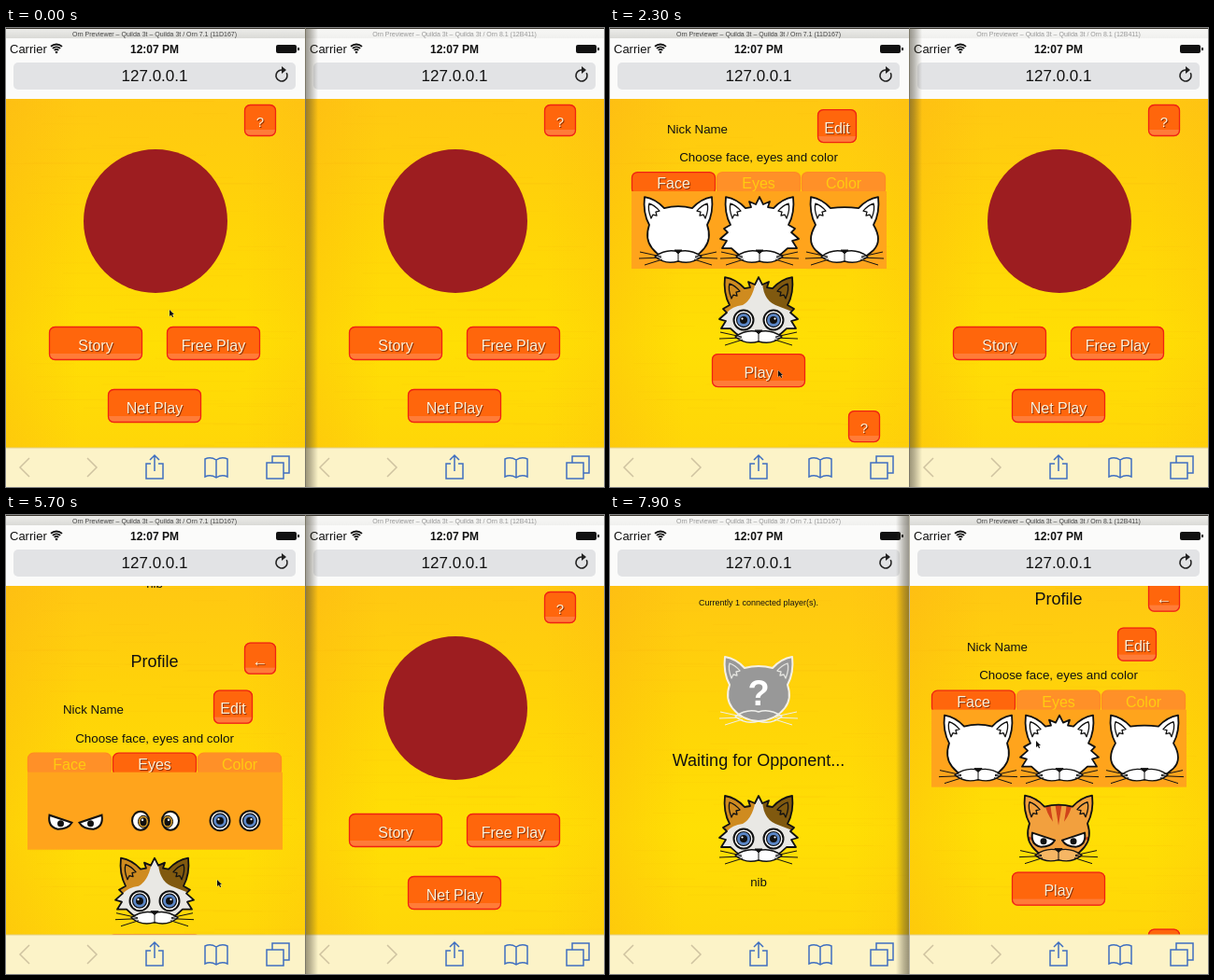
Write an HTML page with a canvas that moves like this. It is 640 px wide and 492 px high and loops after 8 s.

```html
<!DOCTYPE html>
<html lang="en">
<head>
<meta charset="utf-8">
<title>Two phones</title>
<style>
html, body { margin: 0; width: 100%; height: 100%; overflow: hidden; background: #fff; }
canvas { display: block; }
</style>
</head>
<body>
<canvas id="stage" width="640" height="492"></canvas>
<script>
const ctx = document.getElementById('stage').getContext('2d');
const LOOP = 8000, PAGE = 374, TOP = 76, BOTTOM = 450, SHIFT = 321, MID = 159;
const SANS = '"Liberation Sans", Arial, sans-serif';
const NICK = 'nib';

// Timed cursor stops: time, x, y
const stops = [
  [0, 175, 302], [350, 175, 302], [1100, 167, 415], [1750, 167, 415], [2300, 180, 367],
  [2650, 243, 150], [3600, 243, 152], [4050, 158, 210], [4250, 158, 210],
  [4550, 157, 269], [4700, 157, 269], [4950, 245, 270], [5100, 245, 270],
  [5350, 168, 412], [5480, 168, 412], [5700, 226, 391], [5900, 232, 388],
  [6600, 371, 413], [6850, 440, 405], [7200, 444, 405], [7900, 456, 242]
];
const clicks = [[1150, 1500], [2680, 2800], [4120, 4240], [4560, 4590], [4970, 5090], [5370, 5460]];

const HALF_TOP = 'M-15-25';
const RIGHT_EAR = '15-25Q24-35 36-37Q38-20 31-7';
const LEFT_EAR = 'Q-38-20-36-37Q-24-35-15-25Z';
const heads = [
  HALF_TOP + 'Q0-29 ' + RIGHT_EAR + 'Q36 8 28 18Q18 31 0 32Q-18 31-28 18Q-36 8-31-7' + LEFT_EAR,
  HALF_TOP + 'L-9-26L-11-32L-4-29L0-37L4-29L11-32L9-26L' + RIGHT_EAR +
    'L38-3L34 1L42 8L35 10L40 18L30 18Q18 31 0 32Q-18 31-30 18L-40 18L-35 10L-42 8L-34 1L-38-3L-31-7' + LEFT_EAR,
  HALF_TOP + 'Q0-27 ' + RIGHT_EAR + 'Q41 10 31 20Q19 32 0 32Q-19 32-31 20Q-41 10-31-7' + LEFT_EAR
].map(d => new Path2D(d));
const ears = new Path2D('M-29-14Q-33-24-31-30Q-25-28-20-22L-24-21L-23-17L-27-18ZM29-14Q33-24 31-30Q25-28 20-22L24-21L23-17L27-18Z');
const muzzle = new Path2D('M-25 27Q-12 18 0 22Q12 18 25 27Q14 36 0 32Q-14 36-25 27Z');
const whiskers = new Path2D('M-18 27L-41 22M-18 28L-42 29M-17 30L-36 36M18 27L41 22M18 28L42 29M17 30L36 36');
const nose = new Path2D('M-4 20H4L0 24ZM0 24V32');
const angryEye = new Path2D('M-12 2L12-6Q14 7 3 9Q-8 9-12 2Z');

const coats = {
  white: { base: '#fff', patches: [] },
  calico: {
    base: '#e9e8e4',
    patches: [['#cf8b1f', 'M-42-42H-2Q-4-14-17-7Q-28-6-35 2L-42-4Z'], ['#80590f', 'M42-42H4Q2-14 18-7L36 0L42-4Z']]
  },
  tabby: {
    base: '#f2a03e',
    patches: [['#d0441a', 'M-4-30L0-5L4-30ZM-15-30Q-13-18-6-9Q-8-20-9-30ZM15-30Q13-18 6-9Q8-20 9-30ZM-36 6L-24 9L-36 12ZM36 6L24 9L36 12Z']]
  }
};
for (const c of Object.values(coats)) c.patches.forEach(p => { p[1] = new Path2D(p[1]); });

function text(s, x, y, size, color = '#111', align = 'center', weight = '') {
  ctx.font = `${weight} ${size}px ${SANS}`;
  ctx.textAlign = align;
  ctx.textBaseline = 'alphabetic';
  ctx.fillStyle = color;
  ctx.fillText(s, x, y + size * 0.36);
}

function box(x, y, w, h, r, fill, line, width = 1.5) {
  ctx.beginPath();
  ctx.roundRect(x, y, w, h, r);
  if (fill) { ctx.fillStyle = fill; ctx.fill(); }
  if (line) { ctx.strokeStyle = line; ctx.lineWidth = width; ctx.stroke(); }
}

function at(x, y, draw) {
  ctx.save();
  ctx.translate(x, y);
  draw();
  ctx.restore();
}

function ink(path, color, width) {
  ctx.strokeStyle = color;
  ctx.lineWidth = width;
  ctx.stroke(path);
}

function disc(x, y, rx, ry, fill, line) {
  ctx.beginPath();
  ctx.ellipse(x, y, rx, ry, 0, 0, 7);
  ctx.fillStyle = fill;
  ctx.fill();
  if (line) { ctx.strokeStyle = '#111'; ctx.lineWidth = line; ctx.stroke(); }
}

function gradient(x0, y0, x1, y1, ...list) {
  const g = ctx.createLinearGradient(x0, y0, x1, y1);
  for (const [stop, color] of list) g.addColorStop(stop, color);
  return g;
}

function button(label, x, y, w, h, pressed, size = 16) {
  box(x, y, w, h, 6, pressed ? '#ff9f3a' : '#ff660c');
  ctx.save();
  ctx.clip();
  ctx.fillStyle = pressed ? '#ffc68c' : '#ff7c38';
  ctx.fillRect(x, y + h - 7, w, 7);
  ctx.restore();
  box(x + .5, y + .5, w - 1, h - 1, 6, null, pressed ? '#b9661c' : '#ee2312', 1.3);
  const cx = x + w / 2, cy = y + h / 2 + 2;
  text(label, cx + 1, cy + 1, size, '#8a3206');
  text(label, cx, cy, size, '#fff0d8');
}

function eyes(kind, x, y) {
  for (const side of [-1, 1]) at(x + side * 16, y, () => {
    ctx.scale(side, 1);
    if (kind === 0) {
      ctx.fillStyle = '#fff';
      ctx.fill(angryEye);
      disc(0, 3, 3.5, 3.5, '#111');
      ink(angryEye, '#111', 2);
    } else if (kind === 1) {
      disc(0, 0, 9, 10, '#fff', 2);
      disc(-3, 1, 5.5, 6.5, '#d9a02c', 1);
      disc(-3, 1, 3.5, 4.5, '#111');
      disc(-2, -1, 1.2, 1.2, '#fff');
    } else {
      disc(0, 0, 10.5, 10.5, '#fff', 2);
      disc(0, 0, 7.5, 7.5, '#5b86c6', 1.2);
      disc(0, 0, 4, 4, '#111');
      disc(1.5, -1.5, 1.1, 1.1, '#fff');
    }
  });
}

function cat(x, y, face, coat, eyeKind) {
  const head = heads[face], { base, patches } = coats[coat];
  at(x, y, () => {
    ctx.lineJoin = 'round';
    ctx.fillStyle = base;
    ctx.fill(head);
    ctx.save();
    ctx.clip(head);
    for (const [color, shape] of patches) { ctx.fillStyle = color; ctx.fill(shape); }
    ctx.restore();
    ink(head, '#111', 1.8);
    ink(ears, '#111', 1.3);
    if (eyeKind !== undefined) eyes(eyeKind, 0, 9);
    ctx.fillStyle = coat === 'tabby' ? '#f6b664' : '#fff';
    ctx.fill(muzzle);
    ink(muzzle, '#111', 1.4);
    ink(whiskers, '#111', 1);
    ctx.fillStyle = '#111';
    ctx.fill(nose);
    ink(nose, '#111', 1);
  });
}

function unknownCat(x, y) {
  at(x, y, () => {
    ctx.lineJoin = 'round';
    ctx.fillStyle = '#989898';
    ctx.fill(heads[0]);
    ink(heads[0], '#f4f0e4', 2);
    ink(ears, '#e4e4e0', 1.3);
    ink(muzzle, '#f0f0ec', 1.4);
    ink(whiskers, '#f0f0ec', 1);
    text('?', 0, 1, 38, '#fff', 'center', 'bold');
  });
}

function titlePage(p) {
  button('?', 255, 82, 34, 34, false, 15);
  disc(160, 207, 77, 77, '#9d1d20');
  button('Story', 46, 320, 100, 36);
  button('Free Play', 172, 320, 100, 36);
  button('Net Play', 109, 387, 100, 36, p.netDown);
}

function profilePage(p) {
  text('Profile', MID, 102, 18);
  button('←', 255, 82, 34, 34, false, 17);
  text('Nick Name', 61, 154, 13.3, '#111', 'left');
  if (p.scroll === 1) {
    box(141.5, 143, 74, 23, 5, '#fff', '#4a3a20', 1.3);
    text(p.nick, 150, 153, 16, '#111', 'left');
  }
  button('Edit', 222, 133, 42, 36);
  text('Choose face, eyes and color', MID, 184, 13.4);

  ['Face', 'Eyes', 'Color'].forEach((name, i) => {
    const x = 23 + i * 91, on = i === p.tab;
    box(x + .5, 200.5, 89, 24, 6, on ? '#ff660c' : '#ff9028', on ? '#ee2312' : '#ff8a24', 1.3);
    if (on) text(name, x + 46, 213.5, 16, '#8a3206');
    text(name, x + 45, 212.5, 16, on ? '#fff0d8' : '#ffcb10');
  });
  ctx.fillStyle = '#ffa41c';
  ctx.fillRect(23, 221, 273, 83);
  if (p.tab === 0) [73, 160, 251].forEach((x, i) => cat(x, 264, i, 'white'));
  else [74.5, 160, 245].forEach((x, i) => eyes(i, x, 273));

  cat(MID, 350, p.face, p.coat, p.eyes);
  button('Play', 109, 395, 100, 36, p.playDown);
}

function waitingPage(p) {
  text('Currently 1 connected player(s).', MID, 94, 9);
  unknownCat(MID, 189);
  text('Waiting for Opponent...', MID, 263, 18);
  cat(MID, 338, p.face, p.coat, p.eyes);
  text(p.nick, MID, 393, 13.3);
}

function backdrop() {
  ctx.fillStyle = gradient(0, TOP, 0, BOTTOM,
    [0, '#ffc812'], [.35, '#ffd408'], [.7, '#ffdf04'], [1, '#ffd608']);
  ctx.fillRect(0, TOP, 320, PAGE);
  const clear = 'rgba(250,165,20,0)';
  ctx.fillStyle = gradient(0, 0, 320, 0,
    [0, 'rgba(250,165,20,.25)'], [.25, clear], [.8, clear], [1, 'rgba(250,165,20,.15)']);
  ctx.fillRect(0, TOP, 320, PAGE);
  // Faint horizontal grain
  let seed = 9;
  const rnd = () => (seed = seed * 16807 % 2147483647) / 2147483647;
  ctx.fillStyle = 'rgba(235,150,10,.06)';
  for (let i = 0; i < 70; i++) ctx.fillRect(rnd() * 260, TOP + rnd() * PAGE, 30 + rnd() * 110, 1);
}

const icons = [
  [20, 'M5-10L-5 0L5 10', '#cfc3a0'],
  [92, 'M-5-10L5 0L-5 10', '#cfc3a0'],
  [159, 'M-4-4H-9V12H9V-4H4M0 4V-13M-5-8L0-13L5-8', '#3f6fc0'],
  [225, 'M0-8Q-6-12-12-9V10Q-6 7 0 11Q6 7 12 10V-9Q6-12 0-8V11', '#3f6fc0'],
  [291, 'M-12-5H6V12H-12ZM-6-5V-12H12V6H6', '#3f6fc0']
].map(([x, d, c]) => [x, new Path2D(d), c]);

function chrome(title, active) {
  ctx.fillStyle = '#fbfbfa';
  ctx.fillRect(0, 11, 320, TOP - 11);
  ctx.fillStyle = gradient(0, 0, 0, 11, [0, active ? '#eeeeec' : '#f8f8f6'], [1, active ? '#dadad6' : '#f0f0ee']);
  ctx.fillRect(0, 0, 320, 11);
  ctx.fillStyle = '#38342c';
  ctx.fillRect(0, 0, 320, 1);
  text(title, MID, 6.5, 7, active ? '#444' : '#999');

  text('Carrier', 4, 22.5, 13, '#111', 'left');
  text('12:07 PM', MID, 22.5, 12, '#111', 'center', 'bold');
  ctx.strokeStyle = '#111';
  ctx.lineWidth = 1.8;
  for (const r of [3.5, 6.2, 9]) {
    ctx.beginPath();
    ctx.arc(54, 26.5, r, -2.3, -.84);
    ctx.stroke();
  }
  disc(54, 26, 1.3, 1.3, '#111');
  box(289, 18, 22, 9, 2, '#111');
  ctx.fillRect(312, 21, 2, 3);

  box(8, 37, 302, 29, 5, '#e2e3e5');
  text('127.0.0.1', MID, 51, 17);
  ctx.beginPath();
  ctx.arc(295, 51, 6, -.5, 4.9);
  ctx.strokeStyle = '#222';
  ctx.lineWidth = 1.6;
  ctx.stroke();
  ctx.fillStyle = '#222';
  ctx.fill(new Path2D('M295 41L300 45L295 49Z'));

  ctx.fillStyle = '#fcf3c8';
  ctx.fillRect(0, BOTTOM, 320, 42);
  ctx.fillStyle = '#e3cf85';
  ctx.fillRect(0, BOTTOM - .5, 320, 1);
  for (const [x, path, color] of icons) at(x, 471, () => {
    ctx.lineJoin = 'miter';
    ink(path, color, 1.5);
  });
}

function phone(x, title, active, p) {
  ctx.save();
  ctx.translate(x, 0);
  ctx.beginPath();
  ctx.rect(0, 0, 320, 492);
  ctx.clip();
  backdrop();
  ctx.save();
  ctx.beginPath();
  ctx.rect(0, TOP, 320, PAGE);
  ctx.clip();
  [titlePage, profilePage, waitingPage].forEach((page, i) => {
    const dy = (p.scroll - i) * PAGE;
    if (Math.abs(dy) < PAGE) at(0, dy, () => page(p));
  });
  ctx.restore();
  chrome(title, active);
  ctx.restore();
}

function divider(leftActive) {
  const dir = leftActive ? 1 : -1;
  ctx.fillStyle = '#b9b5a4';
  ctx.fillRect(320, 0, 1, 492);
  ctx.fillStyle = gradient(320, 0, 320 + 14 * dir, 0,
    [0, 'rgba(70,65,50,.55)'], [.4, 'rgba(70,65,50,.36)'], [1, 'rgba(70,65,50,0)']);
  ctx.fillRect(leftActive ? 320 : 306, 0, 14, 492);
}

const arrow = new Path2D('M0 0V7L1.8 5.4L3 8L4.2 7.4L3 5H5Z');

function cursor(t) {
  let i = stops.findIndex(s => s[0] > t);
  if (i < 0) i = stops.length;
  const a = stops[i - 1], b = stops[i] || a;
  const k = b === a ? 0 : ease((t - a[0]) / (b[0] - a[0]));
  const x = a[1] + (b[1] - a[1]) * k, y = a[2] + (b[2] - a[2]) * k;
  if (clicks.some(([from, to]) => t >= from && t < to)) {
    ctx.beginPath();
    ctx.arc(x, y, 11, 0, 7);
    ctx.strokeStyle = '#2a1a08';
    ctx.lineWidth = 1.6;
    ctx.stroke();
  }
  at(x, y, () => {
    ink(arrow, 'rgba(255,255,255,.5)', 1);
    ctx.fillStyle = '#111';
    ctx.fill(arrow);
  });
}

function ease(k) {
  k = Math.min(1, Math.max(0, k));
  return k * k * (3 - 2 * k);
}
const slide = (t, start) => ease((t - start) / 1000);

function draw(t) {
  const typed = Math.max(0, Math.floor((t - 2800) / 200));
  const leftActive = t < 7050;
  phone(SHIFT, 'Orn Previewer – Quilda 3t – Quilda 3t / Orn 8.1 (12B411)', !leftActive, {
    scroll: slide(t, 7010), netDown: t >= 7010 && t < 7200,
    nick: '', tab: 0, face: 0, coat: 'tabby', eyes: 0
  });
  phone(0, 'Orn Previewer – Quilda 3t – Quilda 3t / Orn 7.1 (11D167)', leftActive, {
    scroll: slide(t, 1520) + slide(t, 5460),
    netDown: t >= 1150 && t < 1650,
    playDown: t >= 5370 && t < 5560,
    nick: NICK.slice(0, typed),
    tab: t < 4200 ? 0 : 1,
    face: 1, coat: 'calico',
    eyes: t >= 4560 && t < 5000 ? 1 : 2
  });
  divider(leftActive);
  cursor(t);
}

const begin = performance.now();
(function tick() {
  draw((performance.now() - begin) % LOOP);
  requestAnimationFrame(tick);
})();
</script>
</body>
</html>
```
